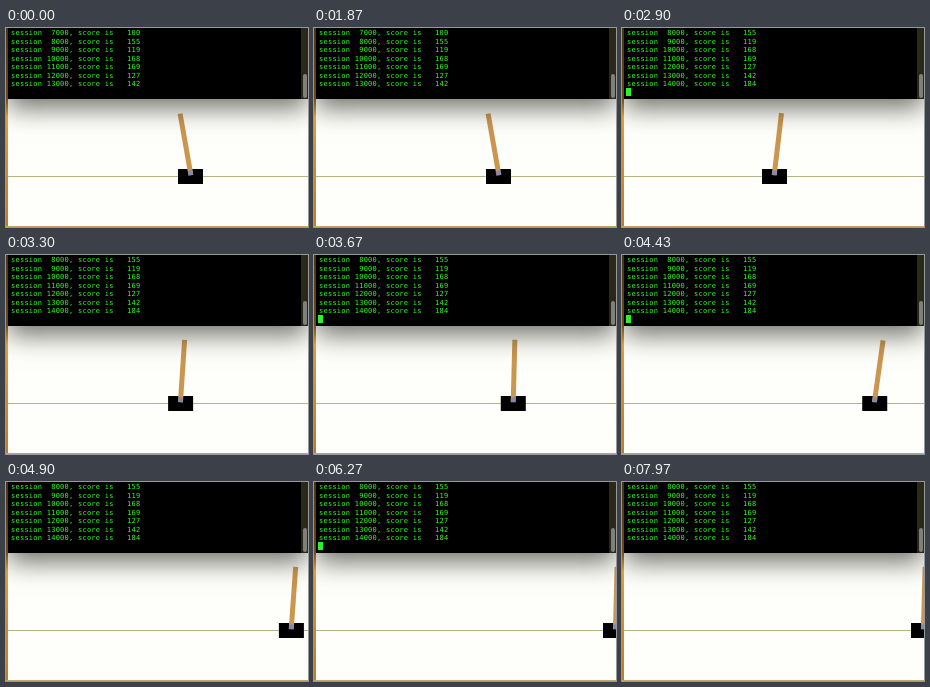
Write an HTML page that moves like this. It is 302 px wide and 199 px high and loops after 8 s.

```html
<!DOCTYPE html>
<html lang="en">
<head>
<meta charset="utf-8">
<title>Cart pole</title>
<style>
  html, body { margin: 0; width: 100%; height: 100%; overflow: hidden; background: #fefefa; }
  #stage { position: relative; width: 302px; height: 199px; overflow: hidden; background: #fefefa; }
  #scene { position: absolute; inset: 0; }
  #desk { position: absolute; inset: 0 auto 0 0; width: 2px;
    background: linear-gradient(#4a3512, #6b4a18 35%, #d9a040 45%, #c88a38 75%, #c07a30); }
  #floor { position: absolute; left: 0; right: 0; bottom: 0; height: 1px; background: #c8a468; }
  #terminal { position: absolute; left: 2px; top: -40px; width: 299px; height: 111px; background: #000;
    box-shadow: 0 9px 24px rgba(28, 28, 18, .62); }
  #log { position: absolute; left: 5px; top: 1.2px; margin: 0; color: #34fa28;
    font: 7px/8.52px "DejaVu Sans Mono", monospace; letter-spacing: .25px; }
  #cursor { position: absolute; left: 4px; top: 60px; width: 5px; height: 8px; background: #28f428; }
  #track { position: absolute; left: 295px; top: 0; width: 7px; height: 71px; background: #2a2818; }
  #thumb { position: absolute; left: 297px; top: 46px; width: 4px; height: 24px; border-radius: 2px; background: #80807a; }
</style>
</head>
<body>
<div id="stage">
  <svg id="scene" width="302" height="199" viewBox="0 0 302 199">
    <path d="M2 148.5H302" stroke="#b4b480"/>
    <g id="cart">
      <rect x="-12.5" y="141" width="25" height="15" fill="#000"/>
      <g transform="translate(0 144.75)">
        <rect id="pole" x="-2.5" y="-60" width="5" height="62.5" fill="#ca9650"/>
        <circle r="2.5" fill="#8585bd"/>
      </g>
    </g>
  </svg>
  <div id="terminal"></div>
  <div id="desk"></div>
  <div id="floor"></div>
  <div id="track"></div>
  <div id="thumb"></div>
  <pre id="log"></pre>
  <div id="cursor"></div>
</div>
<script>
  const LOOP = 8000, STEP = 100 / 3, RESET = 2530;
  const scores = [100, 155, 119, 168, 169, 127, 142, 184];
  const $ = id => document.getElementById(id);
  const cart = $('cart'), pole = $('pole'), log = $('log'), cursor = $('cursor');

  // time, cart centre, pole angle in degrees
  const poses = [
    [2530, 153, 2],
    [2900, 152.5, 6.7],
    [3670, 199.5, 1.5],
    [4430, 252.5, 8],
    [5130, 301.5, 1.5]
  ];

  const lines = scores.map((score, i) =>
    `session ${String((i + 7) * 1000).padStart(5)}, score is ${String(score).padStart(5)}`);
  const pages = [lines.slice(0, 7).join('\n'), lines.slice(1).join('\n')];

  function slope(i, k) {
    const a = poses[Math.max(i - 1, 0)], b = poses[Math.min(i + 1, poses.length - 1)];
    return (b[k] - a[k]) / (b[0] - a[0]);
  }

  // Cubic Hermite curve through the poses
  function sample(t, k) {
    const last = poses.length - 1;
    if (t >= poses[last][0]) return poses[last][k];
    let i = 0;
    while (t >= poses[i + 1][0]) i++;
    const a = poses[i], b = poses[i + 1], span = b[0] - a[0], u = (t - a[0]) / span;
    const u2 = u * u, u3 = u2 * u;
    return (2 * u3 - 3 * u2 + 1) * a[k] + (u3 - 2 * u2 + u) * span * slope(i, k)
      + (3 * u2 - 2 * u3) * b[k] + (u3 - u2) * span * slope(i + 1, k);
  }

  function draw(now) {
    const time = now % LOOP;
    const t = Math.floor(time / STEP + 0.2) * STEP;
    const running = time >= RESET;
    const x = running ? sample(Math.max(t, RESET), 1) : 184.5;
    const angle = running ? sample(Math.max(t, RESET), 2) : -10;
    cart.setAttribute('transform', `translate(${x.toFixed(2)} 0)`);
    pole.setAttribute('transform', `rotate(${angle.toFixed(2)})`);

    const page = pages[running ? 1 : 0];
    if (log.textContent !== page) log.textContent = page;
    const blink = time % 800;
    cursor.style.visibility = blink >= 350 && blink < 750 ? 'visible' : 'hidden';
  }

  const start = performance.now();
  function tick() {
    draw(performance.now() - start);
    requestAnimationFrame(tick);
  }
  tick();
</script>
</body>
</html>
```
